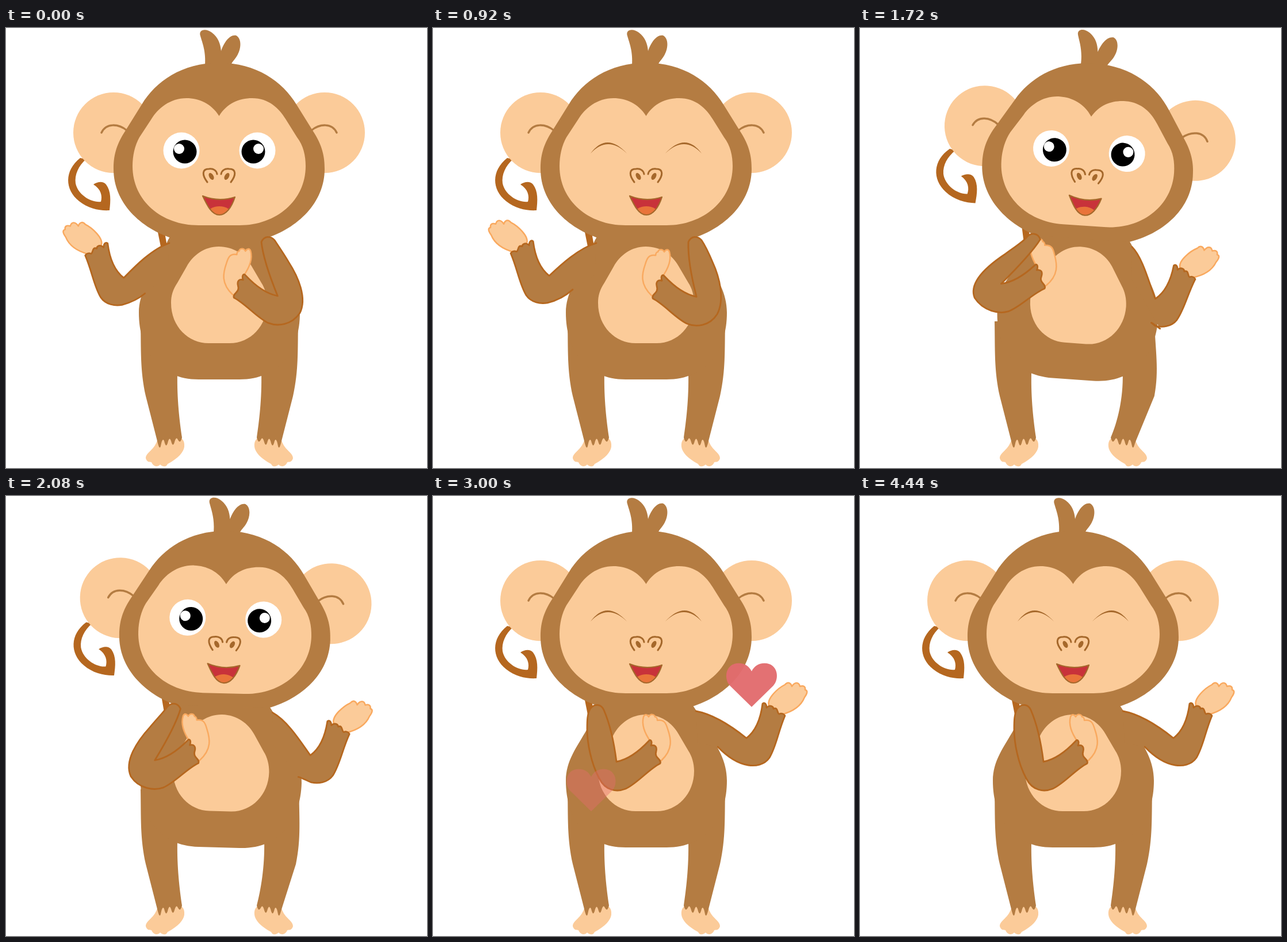
Animation, 732 px wide and 765 px high, one loop 4520 ms. Source, as an HTML page with a canvas:

```html
<!DOCTYPE html>
<html lang="en">
<head>
<meta charset="utf-8">
<title>Dancing monkey</title>
<style>
html, body { margin: 0; width: 100%; height: 100%; overflow: hidden; background: #fff; }
canvas { display: block; }
</style>
</head>
<body>
<canvas id="stage" width="732" height="765"></canvas>
<script>
const ctx = document.getElementById('stage').getContext('2d');
const LOOP = 4520, STEP = 40, AXIS = 370.5, RAD = Math.PI / 180;
const FUR = '#b47c42', SKIN = '#fbcb99', EDGE = '#b5671f', PALM = '#f9a95f', LINE = '#a5682b';

const TAIL = `M129 226C101 248 102 281 127 301C143 314 163 318 180 317C182 300 183 284 174 272
  C168 265 158 268 152 272C165 280 168 292 165 302C148 304 125 290 121 270C119 255 126 240 139 228Z
  M263 350L270 385L281 385L275 350Z`;
const TORSO = `M285 363C276 376 274 395 268 405C250 437 231 460 231 495C231 560 266 611 335 611
  L406 611C476 611 511 560 511 495C511 460 494 435 478 410C468 392 463 380 451 363Z`;
const BELLY = `M370 380C345 380 325 395 314 415L298 443C290 455 287 465 287 478C287 520 318 548 352 548
  L389 548C425 548 454 518 454 478C454 465 450 452 444 443L427 414C416 394 395 380 370 380Z`;
const HEAD = `M370.5 60.5C306 60.5 260 93 236 133L208 178C190 205 187 225 187 245C187 304 234 348 290 366
  L451 366C507 348 554 304 554 245C554 225 551 205 533 178L505 133C481 93 435 60.5 370.5 60.5Z`;
const HAIR = `M346 66C348 40 341 25 338 14C334 2 348 0 358 8C369 16 373 28 374 40C379 25 389 11 400 13
  C410 18 409 35 403 46C399 54 394 57 390 66Z`;
const FACE = `M370.5 153C357 131 335 122 314 122C285 122 264 140 253 158L232 190C224 204 220 222 220 240
  C220 300 270 343 335 343L406 343C470 343 521 300 521 240C521 222 517 204 506 190L486 158
  C475 140 457 122 428 122C405 122 384 131 370.5 153Z`;
const MOUTH = 'M342 292Q370 303 398 294C392 313 382 325 371 325C358 325 350 309 342 292Z';
const FOOT = `M263 717C257 735 243 738 243 748C245 756 251 754 253 755C256 763 264 764 268 759
  C274 764 279 763 281 758C300 748 309 737 310 728C311 717 306 713 300 711Z`;
const HEART = 'M0 38L-37 1C-48 -11 -45 -38 -22 -38C-11 -38 -4 -32 0 -24C4 -32 11 -38 22 -38C45 -38 48 -11 37 1Z';

const hearts = [
  { x: 554, y: 352, starts: [2850, 3690] },
  { x: 275, y: 512, starts: [2985, 3775] },
  { x: 181, y: 220, starts: [3040, 3960] }
];

const clamp = v => Math.min(1, Math.max(0, v));
const ease = (t, from, to) => (1 - Math.cos(Math.PI * clamp((t - from) / (to - from)))) / 2;

function fill(path, color) {
  ctx.fillStyle = color;
  ctx.fill(new Path2D(path));
}

function stroke(path, color, width) {
  ctx.strokeStyle = color;
  ctx.lineWidth = width;
  ctx.stroke(new Path2D(path));
}

function oval(x, y, rx, color, ry = rx, tilt = 0) {
  ctx.fillStyle = color;
  ctx.beginPath();
  ctx.ellipse(x, y, rx, ry, tilt, 0, 7);
  ctx.fill();
}

function mirrored(flip, draw, axis = AXIS) {
  ctx.save();
  if (flip) {
    ctx.translate(2 * axis, 0);
    ctx.scale(-1, 1);
  }
  draw();
  ctx.restore();
}

const bothSides = draw => [false, true].forEach(flip => mirrored(flip, draw));

// How far the elbow moves when the upper arm turns about its shoulder.
function elbowShift(x, y, degrees) {
  const c = Math.cos(degrees * RAD), s = Math.sin(degrees * RAD);
  return [x * c - y * s - x, x * s + y * c - y];
}

function shifter([dx, dy]) {
  return (x, y, kx = 1, ky = kx) => `${x + dx * kx} ${y + dy * ky} `;
}

function hand(path, [dx, dy]) {
  ctx.save();
  ctx.translate(dx, dy);
  fill(path, SKIN);
  stroke(path, PALM, 2.5);
  ctx.restore();
}

function raisedArm(angle) {
  const shift = elbowShift(85, 46, angle), p = shifter(shift);
  hand(`M584 364C580 352 600 334 612 328C617 322 622 325 624 331C629 323 636 323 638 331
    C644 329 648 331 647 337C652 338 651 343 646 350C640 365 625 375 606 380`, shift);
  const outline = `M457 374C${p(490, 380, .3)}${p(525, 405, .8)}${p(545, 421)}
    C${p(562, 408)}${p(570, 385)}${p(573, 361)}C${p(577, 358)}${p(580, 362)}${p(580, 368)}
    C${p(586, 362)}${p(592, 366)}${p(592, 370)}C${p(600, 366)}${p(598, 378)}${p(602, 379)}
    C${p(606, 377)}${p(610, 379)}${p(612, 382)}C${p(600, 410)}${p(597, 435)}${p(585, 455)}
    C${p(576, 468)}${p(560, 470)}${p(548, 468)}Q${p(522, 464, .8)}${p(495, 436, -.5, 1.9)}`;
  fill(outline + 'L460 430Z', FUR);
  stroke(outline, EDGE, 2.8);
}

function bentArm(angle) {
  const shift = elbowShift(33, 99, angle), p = shifter(shift);
  hand(`M379 428C366 410 363 395 366 384C368 378 373 380 375 384C378 378 385 379 386 384
    C389 384 390 388 390 390C402 388 405 395 408 405C414 422 418 440 397 460`, shift);
  const outline = `M${p(268, 405, .36)}C${p(268, 392, .2)} 268 378 274 369C281 361 292 361 297 372
    C${p(307, 395, .25)}${p(315, 430, .65)}${p(319, 462)}C${p(340, 458)}${p(360, 442)}${p(375, 426)}
    C${p(378, 422)}${p(382, 426)}${p(379, 434)}C${p(386, 432)}${p(390, 436)}${p(388, 444)}
    C${p(384, 456)}${p(398, 457)}${p(395, 465)}C${p(375, 475)}${p(355, 500)}${p(335, 509)}
    C${p(320, 515)}${p(300, 513, 1.1)}${p(289, 491, 1.17)}C${p(275, 465, 1.15)}${p(268, 430, .7)}${p(268, 405, .36)}Z`;
  fill(outline, FUR);
  stroke(outline, EDGE, 2.8);
}

function leg(bend) {
  fill(FOOT, SKIN);
  const p = shifter([bend, 0]);
  fill(`M${p(234, 510, .3)}C${p(235, 560, .5)}${p(233, 595, .9)}${p(243, 640)}
    L264 722Q267 734 269 727Q272 711 275 718Q278 731 281 722Q284 709 287 718Q290 730 293 720
    Q296 709 299 716Q303 724 306 712C${p(302, 685, .6)}${p(297, 645)}${p(298, 600)}L310 510Z`, FUR);
}

function drawHead(eyesClosed) {
  bothSides(() => {
    oval(187, 182, 70, SKIN);
    stroke('M166 182C174 165 195 166 210 178', FUR, 3.5);
  });
  fill(HAIR, FUR);
  fill(HEAD, FUR);
  fill(FACE, SKIN);
  if (eyesClosed) {
    bothSides(() => fill('M274 218Q302 180 337 218Q304 186 274 218Z', LINE));
  } else {
    for (const [eye, pupil, glint] of [[305, 311, 301], [437, 430, 439]]) {
      oval(eye, 213, 31.5, '#fff');
      oval(pupil, 215, 20.5, '#000');
      oval(glint, 210, 9, '#fff');
    }
  }
  bothSides(() => {
    stroke('M350 268C341 256 340 245 353 245C361 244 366 248 367 254', LINE, 3);
    oval(357, 258, 3.8, LINE, 6.5, -.5);
  });
  ctx.save();
  ctx.clip(new Path2D(MOUTH));
  fill(MOUTH, '#c8323a');
  oval(371, 324, 21, '#e9743a', 14);
  ctx.restore();
  stroke(MOUTH, LINE, 2.2);
}

function drawHeart({ x, y, starts }, t) {
  for (const start of starts) {
    const u = (t - start) / 480;
    if (u <= 0 || u >= 1) continue;
    ctx.save();
    ctx.globalAlpha = .96 * clamp((t - start) / 34) * clamp((1 - u) / .2);
    ctx.translate(x, y - 150 * u ** 1.6);
    const size = .96 + .04 * clamp(u * 6);
    ctx.scale(size * 1.02, size);
    fill(HEART, '#e26c6e');
    ctx.restore();
  }
}

function draw(t) {
  const leftward = t < 1320;
  const lean = leftward
    ? 4 * ease(t, 0, 300) * (1 - ease(t, 310, 890))
    : 4 * ease(t, 1285, 1690) * (1 - ease(t, 1750, 2330));
  const dance = 1 - (leftward ? ease(t, 810, 1120) : ease(t, 2250, 2560));
  const eyesClosed = leftward ? t >= 280 : t >= 2240;

  ctx.fillStyle = '#fff';
  ctx.fillRect(0, 0, 732, 765);
  ctx.lineCap = ctx.lineJoin = 'round';

  mirrored(false, () => leg(leftward ? -3.2 * lean : 0));
  mirrored(true, () => leg(leftward ? 0 : -3.2 * lean), 371);

  ctx.save();
  ctx.translate(AXIS, 605);
  ctx.rotate((leftward ? -lean : lean) * RAD);
  ctx.translate(-AXIS, -605);
  fill(TAIL, EDGE);
  fill(TORSO, FUR);
  fill(BELLY, SKIN);
  drawHead(eyesClosed);
  mirrored(leftward, () => {
    raisedArm((9.5 + 6.3 * lean) * dance);
    bentArm((28 + 5 * lean) * dance);
  });
  ctx.restore();

  hearts.forEach(heart => drawHeart(heart, t));
}

const began = performance.now();
function tick() {
  const t = (performance.now() - began) % LOOP;
  draw(Math.floor(t / STEP) * STEP);
  requestAnimationFrame(tick);
}
tick();
</script>
</body>
</html>
```
